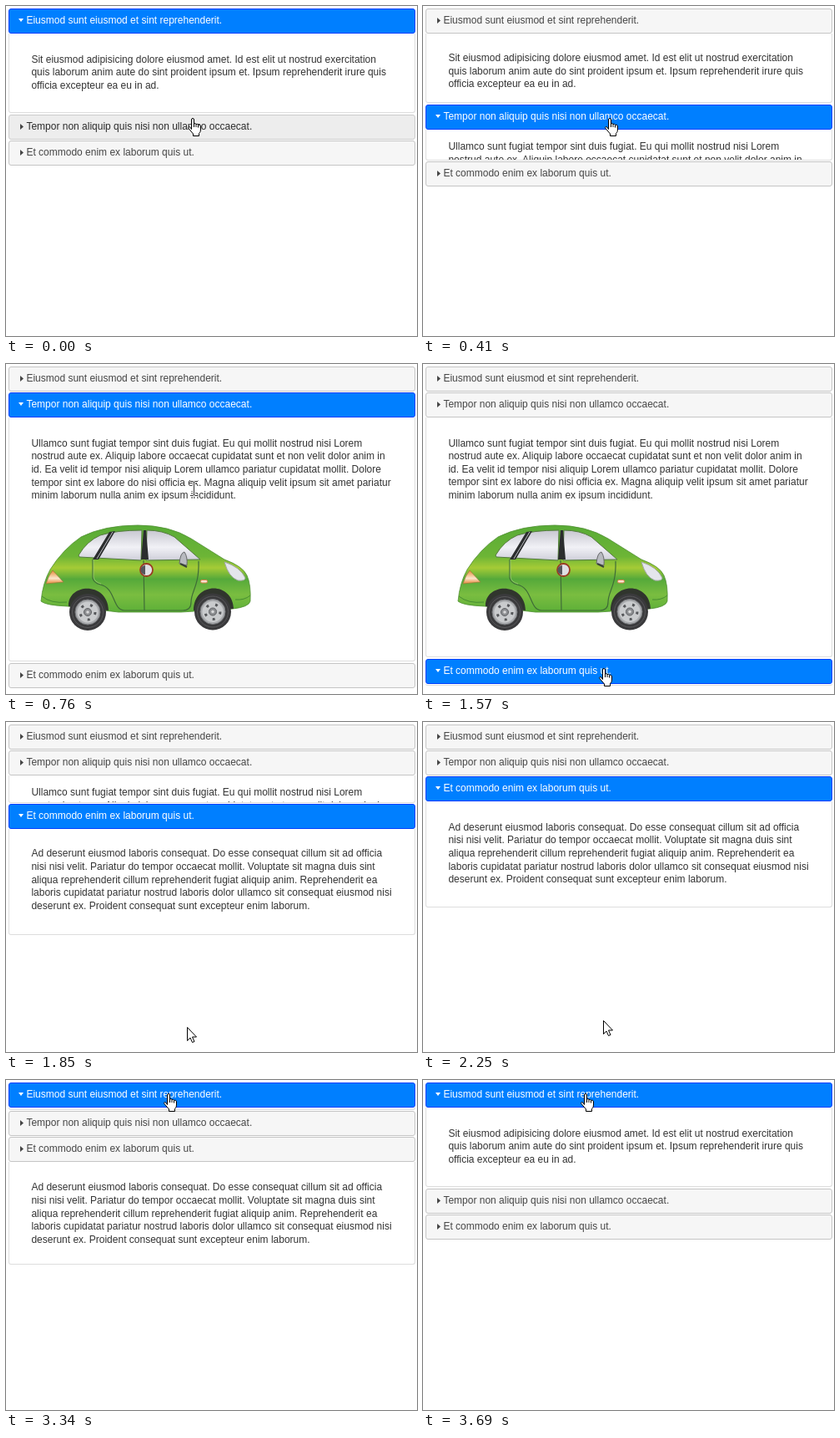
Write an HTML page that moves like this. It is 493 px wide and 395 px high and loops after 4220 ms.

```html
<!DOCTYPE html>
<html lang="en">
<head>
<meta charset="utf-8">
<title>Accordion</title>
<style>
  html, body { margin: 0; width: 100%; height: 100%; overflow: hidden; background: #fff; }
  body { position: relative; font: 12px/15.6px "Liberation Sans", Arial, sans-serif; }
  .head, .panel { position: absolute; left: 3px; width: 488px; box-sizing: border-box; }
  .head {
    top: 0; height: 30px; padding: 6px 0 0 20.4px; white-space: pre;
    border: 1px solid #c5c5c5; border-radius: 3px; background: #f6f6f6; color: #454545;
  }
  .head::before {
    content: ""; position: absolute; left: 13px; top: 10px; width: 4px; height: 7px;
    background: #444; clip-path: polygon(0 0, 100% 50%, 0 100%);
  }
  .head.hover { border-color: #ccc; background: #ededed; color: #2b2b2b; }
  .head.active { border-color: #003eff; background: #007fff; color: #fff; }
  .head.active::before {
    left: 11px; top: 11px; width: 6px; height: 4px;
    background: #fff; clip-path: polygon(0 0, 100% 0, 50% 100%);
  }
  .panel {
    overflow: hidden; border: 1px solid #ddd; border-top: 0;
    border-radius: 0 0 3px 3px; background: #fff; color: #333;
  }
  .body { position: absolute; left: 0; top: 0; }
  .body p { position: absolute; left: 26.4px; top: 23.75px; margin: 0; white-space: pre; }
  .body svg { position: absolute; left: -4px; top: 0; }
  #cursor { position: absolute; left: 0; top: 0; overflow: visible; }
</style>
</head>
<body>
<div class="head">Eiusmod sunt eiusmod et sint reprehenderit.</div>
<div class="panel"><div class="body"><p>Sit eiusmod adipisicing dolore eiusmod amet. Id est elit ut nostrud exercitation
quis laborum anim aute do sint proident ipsum et. Ipsum reprehenderit irure quis
officia excepteur ea eu in ad.</p></div></div>

<div class="head">Tempor non aliquip quis nisi non ullamco occaecat.</div>
<div class="panel"><div class="body"><p>Ullamco sunt fugiat tempor sint duis fugiat. Eu qui mollit nostrud nisi Lorem
nostrud aute ex. Aliquip labore occaecat cupidatat sunt et non velit dolor anim in
id. Ea velit id tempor nisi aliquip Lorem ullamco pariatur cupidatat mollit. Dolore
tempor sint ex labore do nisi officia ex. Magna aliquip velit ipsum sit amet pariatur
minim laborum nulla anim ex ipsum incididunt.</p>
<svg width="493" height="292" viewBox="0 64 493 292">
  <defs>
    <linearGradient id="paint" x1="0" y1="193" x2="0" y2="297" gradientUnits="userSpaceOnUse">
      <stop offset="0" stop-color="#58ab36"/>
      <stop offset=".36" stop-color="#6db536"/>
      <stop offset=".49" stop-color="#a5cb36"/>
      <stop offset=".62" stop-color="#55a93a"/>
      <stop offset=".8" stop-color="#7abd40"/>
      <stop offset="1" stop-color="#5caf38"/>
    </linearGradient>
    <linearGradient id="glass" x1="0" y1="200" x2="0" y2="235" gradientUnits="userSpaceOnUse">
      <stop offset="0" stop-color="#c9c9d2"/>
      <stop offset=".55" stop-color="#f1f1f6"/>
      <stop offset="1" stop-color="#cfcfda"/>
    </linearGradient>
    <linearGradient id="amber" x1="0" y1="247" x2="0" y2="263" gradientUnits="userSpaceOnUse">
      <stop offset="0" stop-color="#e58a35"/>
      <stop offset=".6" stop-color="#fbe6cb"/>
      <stop offset="1" stop-color="#e8863a"/>
    </linearGradient>
    <g id="wheel">
      <circle r="22" fill="#3a3a3c"/>
      <circle r="18.5" fill="none" stroke="#58585a"/>
      <circle r="15" fill="#a9abae" stroke="#77797c"/>
      <circle r="12.5" fill="#c9cbcd"/>
      <circle r="9" fill="none" stroke="#55575a" stroke-width="3" stroke-dasharray="3 8.31"/>
      <circle r="4.5" fill="#8c8e91" stroke="#606265"/>
      <circle r="1.8" fill="#d8d9da"/>
    </g>
  </defs>
  <path d="M42 284Q44 262 53 246Q68 222 90 207Q118 193 158 193Q196 193 222 209L262 234Q284 242 289 253Q294 264 293 284Q291 291 272 293L210 297H135L74 290Q48 289 42 284Z"
    fill="url(#paint)" stroke="#4e8f31" stroke-width=".8"/>
  <path d="M75 290C74 262 122 260 123 295ZM225 295C225 260 272 260 273 293Z" fill="#30352d"/>
  <path d="M87 229Q97 212 113 205Q132 199 163 199L162 235L88 231ZM169 199Q188 199 202 207L233 234L168 235Z"
    fill="url(#glass)" stroke="#547a3f"/>
  <path d="M124 201L131 200L111 234H104ZM165 199H168L171 234H162Z" fill="#2b2d2e"/>
  <path d="M128 201L109 233" stroke="#b9bbc0"/>
  <path d="M104 234V256Q105 262 113 264C132 268 127 294 142 295H212Q222 295 222 285C222 272 232 266 231 236M165 235L166 295"
    fill="none" stroke="#3f6c37" stroke-width="1.2"/>
  <path d="M105 234V255Q106 261 114 263" fill="none" stroke="#a5cf7b" stroke-width=".7"/>
  <path d="M48 263Q51 253 56 247L69 261Z" fill="url(#amber)" stroke="#9a7b3a" stroke-width=".7"/>
  <path d="M262 237Q281 243 287 256Q287 260 278 259Q267 255 262 237Z" fill="#e4e5ec" stroke="#a0a8a0"/>
  <path d="M43 278Q54 287 73 285M275 282Q286 283 293 277" fill="none" stroke="#478d32"/>
  <path d="M208 239Q209 226 214 225Q218 231 217 241Z" fill="#b8bac0" stroke="#66686a"/>
  <path d="M209 239L217 243" stroke="#38413a" stroke-width="2"/>
  <rect x="233.5" y="258.500" width="8" height="3.500" rx="1.500" fill="#f7e2cf" stroke="#d78149"/>
  <circle cx="168.500" cy="246.500" r="7.500" fill="#dfe0e4" stroke="#9a3b22" stroke-width="1.800"/>
  <path d="M167 241A5.500 5.500 0 0 0 167 252Z" fill="#55565c"/>
  <use href="#wheel" x="98" y="297"/>
  <use href="#wheel" x="248" y="296.500"/>
</svg></div></div>

<div class="head">Et commodo enim ex laborum quis ut.</div>
<div class="panel"><div class="body"><p>Ad deserunt eiusmod laboris consequat. Do esse consequat cillum sit ad officia
nisi nisi velit. Pariatur do tempor occaecat mollit. Voluptate sit magna duis sint
aliqua reprehenderit cillum reprehenderit fugiat aliquip anim. Reprehenderit ea
laboris cupidatat pariatur nostrud laboris dolor ullamco sit consequat eiusmod nisi
deserunt ex. Proident consequat sunt excepteur enim laborum.</p></div></div>

<svg id="cursor" width="1" height="1">
  <g id="hand" fill="#fff" stroke="#000" transform="translate(-6 -1)">
    <path d="M4.500 13.500V2Q4.500 .5 6 .5T7.500 2V7Q9.200 5.800 10 7.500Q11.700 6.600 12.500 8.300Q15 7.300 15.500 10V14Q15.500 17 13.500 18.500V21.500H6.500V19L1 12.500Q0 10.800 1.500 10.500Q3 10.500 4.500 13.500Z"/>
    <path d="M7.500 7V11M10 7.500V11M12.500 8.500V11.500" fill="none"/>
  </g>
  <g id="beam" fill="none">
    <path d="M-4 -8.500H-1L.5 -7.500L2 -8.500H5M.5 -8V8M-4 8.500H-1L.5 7.500L2 8.500H5" stroke="#fff" stroke-width="3"/>
    <path d="M-4 -8.500H-1L.5 -7.500L2 -8.500H5M.5 -8V8M-4 8.500H-1L.5 7.500L2 8.500H5" stroke="#333"/>
  </g>
  <path id="arrow" d="M.5 .5V16.500L4 13L6.500 18.500L9 17.500L6.500 12H11.500Z" fill="#fff" stroke="#000"/>
</svg>

<script>
const LOOP = 4220, SLIDE = 400, HEAD = 30, PAD = 12, LINE = 15.6;
const $ = id => document.getElementById(id);
const heads = [...document.querySelectorAll('.head')];
const panels = [...document.querySelectorAll('.panel')];
const bodies = panels.map(p => p.firstElementChild);
const full = [95, 292, 127];
const lines = [3, 5, 5];

const run = (from, count, step) => Array.from({ length: count }, (_, i) => from + i * step);
const ticks = [0, ...run(270, 8, 70), ...run(820, 8, 70), 1380, 1460, ...run(1570, 5, 70),
  1930, 1990, ...run(2250, 9, 70), ...run(3140, 7, 80), 3690];

// Clicks: header turns active, then the panels slide
const clicks = [
  { at: -1000, slide: -1000, from: 2, to: 0 },
  { at: 270, slide: 317, from: 0, to: 1 },
  { at: 1380, slide: 1537, from: 1, to: 2 },
  { at: 3140, slide: 3257, from: 2, to: 0 }
];

// Pointer trips: start, end, from, to, sideways bow
const trips = [
  [620, 760, [224, 135], [225, 149], 0],
  [760, 1340, [225, 149], [217, 365], 8],
  [2190, 2800, [217, 365], [195, 17], 0]
];

const clamp = v => Math.max(0, Math.min(1, v));
const swing = v => 0.5 - Math.cos(clamp(v) * Math.PI) / 2;

function pointer(t) {
  const [start, end, a, b, bow] = trips.findLast(trip => trip[0] <= t) || trips[0];
  const p = swing((t - start) / (end - start));
  return [a[0] + (b[0] - a[0]) * p + bow * Math.sin(p * Math.PI), a[1] + (b[1] - a[1]) * p];
}

function draw(t) {
  const { slide, from, to } = clicks.findLast(c => c.at <= t);
  const p = swing((t - slide) / SLIDE);
  const [x, y] = pointer(t);
  let top = 3, shape = 'arrow';

  heads.forEach((head, i) => {
    const share = i === to ? p : i === from ? 1 - p : 0;
    // The last panel reaches its full height early when opening
    const grow = i === 2 && i === to ? Math.min(1, share * 1.13) : share;
    const height = Math.round(full[i] * grow);
    const below = top + HEAD;
    const over = y >= top && y < below;
    const text = below + PAD * (1 + share);

    head.style.top = top + 'px';
    head.classList.toggle('active', i === to);
    head.classList.toggle('hover', over && i !== to);
    panels[i].style.display = height > 0 ? '' : 'none';
    panels[i].style.top = below + 'px';
    panels[i].style.height = height + 'px';
    bodies[i].style.top = PAD * (share - 1) + 'px';

    if (over) shape = 'hand';
    else if (y >= text && y < Math.min(text + lines[i] * LINE, below + height)) shape = 'beam';
    top = below + 1 + Math.round((full[i] + 1) * share);
  });

  for (const id of ['hand', 'beam', 'arrow']) $(id).style.display = id === shape ? '' : 'none';
  $('cursor').style.transform = `translate(${Math.round(x)}px, ${Math.round(y)}px)`;
}

const begin = performance.now();
function frame() {
  const t = (performance.now() - begin) % LOOP;
  draw(ticks.findLast(tick => tick <= t));
  requestAnimationFrame(frame);
}
frame();
</script>
</body>
</html>
```
